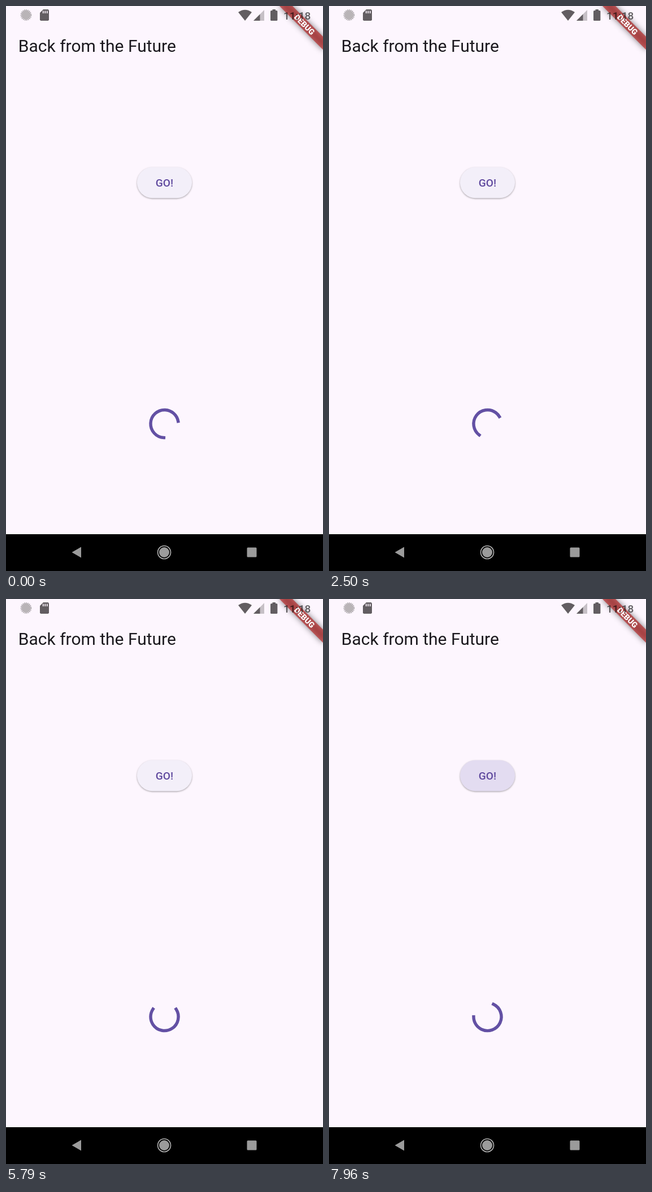
An HTML page with a canvas for the animation above (8 s loop, 561 by 998 pixels).

```html
<!DOCTYPE html>
<html lang="en">
<head>
<meta charset="utf-8">
<title>Back from the Future</title>
<style>
  html, body { margin: 0; width: 100%; height: 100%; overflow: hidden; background: #fdf6fe; }
  canvas { display: block; }
</style>
</head>
<body>
<canvas id="stage" width="561" height="998"></canvas>
<script>
const ctx = document.getElementById('stage').getContext('2d');
const W = 561, H = 998, DP = W / 411.43, LOOP = 8000;
const TAU = Math.PI * 2;
const PATH_MS = 1333, TURN_MS = 2222;
const PATH_PHASE = 0.364, TURN_PHASE = 0.416;
const PAGE = '#fdf6fe', PURPLE = '#6350a4', ICON = '#625d61';
const BUTTON = { x: 231.9, y: 284.7, w: 97.2, h: 54.5 };

const clamp = v => Math.min(1, Math.max(0, v));
const frac = v => v - Math.floor(v);

// cubic-bezier(0.4, 0, 0.2, 1), solved for x by bisection
function ease(x) {
  if (x <= 0 || x >= 1) return clamp(x);
  let lo = 0, hi = 1;
  for (let i = 0; i < 24; i++) {
    const u = (lo + hi) / 2, v = 1 - u;
    if (1.2 * v * v * u + 0.6 * v * u * u + u * u * u < x) lo = u; else hi = u;
  }
  return lo * lo * (3 - 2 * lo);
}

function text(str, x, y, size, weight, color, align = 'left') {
  ctx.font = `${weight} ${size}px Roboto, sans-serif`;
  ctx.textAlign = align;
  ctx.fillStyle = color;
  ctx.fillText(str, x, y);
}

function poly(color, ...pts) {
  ctx.beginPath();
  for (let i = 0; i < pts.length; i += 2) ctx.lineTo(pts[i], pts[i + 1]);
  ctx.closePath();
  ctx.fillStyle = color;
  ctx.fill();
}

function disc(x, y, r, color) {
  ctx.beginPath();
  ctx.arc(x, y, r, 0, TAU);
  ctx.fillStyle = color;
  ctx.fill();
}

function ring(x, y, r, width, color) {
  ctx.beginPath();
  ctx.arc(x, y, r, 0, TAU);
  ctx.lineWidth = width;
  ctx.strokeStyle = color;
  ctx.stroke();
}

function pill(color) {
  ctx.beginPath();
  ctx.roundRect(BUTTON.x, BUTTON.y, BUTTON.w, BUTTON.h, BUTTON.h / 2);
  ctx.fillStyle = color;
  ctx.fill();
}

function drawBanner() {
  ctx.save();
  ctx.translate(W, 0);
  ctx.rotate(Math.PI / 4);
  const band = [-40, 28, 80, 12].map(v => v * DP);
  ctx.filter = 'blur(5.4px)';
  ctx.fillStyle = 'rgba(0,0,0,0.5)';
  ctx.fillRect(...band);
  ctx.filter = 'none';
  ctx.fillStyle = 'rgba(183,28,28,0.63)';
  ctx.fillRect(...band);
  text('DEBUG', 0, 34 * DP + 5, 10.2 * DP, 900, '#fff', 'center');
  ctx.restore();
}

function drawStatus() {
  disc(35.5, 16, 8.2, '#b9b4b7');
  ctx.setLineDash([1.6, 1.4]);
  ring(35.5, 16, 9, 1.6, '#9a9599');
  ctx.setLineDash([]);

  poly(ICON, 66, 6, 74.5, 6, 76, 7.5, 76, 24.5, 74.5, 26, 61.5, 26, 60, 24.5, 60, 12);
  ctx.fillStyle = PAGE;
  for (const x of [65.5, 69, 72.5]) ctx.fillRect(x - 0.6, 8.5, 1.7, 4.5);

  ctx.beginPath();
  ctx.moveTo(423, 26);
  ctx.lineTo(411, 11);
  ctx.quadraticCurveTo(423, 2.5, 435, 11);
  ctx.closePath();
  ctx.fillStyle = ICON;
  ctx.fill();

  poly('#c6c0c6', 457, 7, 457, 26, 438, 26);
  poly(ICON, 449.5, 14.5, 449.5, 26, 438, 26);

  ctx.fillStyle = ICON;
  ctx.fillRect(471.5, 6, 5.5, 3);
  ctx.beginPath();
  ctx.roundRect(468, 8, 12.4, 18, 1.5);
  ctx.fill();

  text('11:18', 491, 23.5, 14 * DP, 500, 'rgba(0,0,0,0.6)');
}

function drawNav() {
  const gray = '#9b9b9b';
  ctx.fillStyle = '#000';
  ctx.fillRect(0, 933, W, H - 933);
  poly(gray, 116.5, 965, 133, 955.5, 133, 974.5);
  disc(280, 965, 9, gray);
  ring(280, 965, 11.5, 1.6, '#b5b5b5');
  ctx.beginPath();
  ctx.roundRect(426.5, 956.5, 17, 17, 1.5);
  ctx.fillStyle = gray;
  ctx.fill();
}

function drawButton(t) {
  ctx.save();
  ctx.shadowColor = 'rgba(0,0,0,0.34)';
  ctx.shadowBlur = 3;
  ctx.shadowOffsetY = 1.2;
  pill('#f3eff9');
  ctx.restore();

  // press highlight and spreading ink
  const press = clamp((t - 6300) / 600);
  if (press > 0) {
    pill(`rgba(103,80,164,${0.08 * press})`);
    ctx.save();
    ctx.beginPath();
    ctx.roundRect(BUTTON.x, BUTTON.y, BUTTON.w, BUTTON.h, BUTTON.h / 2);
    ctx.clip();
    disc(280.5, 312, 15 + 45 * press, `rgba(103,80,164,${0.03 + 0.01 * press})`);
    ctx.restore();
  }
  text('GO!', 280.5, 318.8, 14 * DP, 500, '#604a9f', 'center');
}

// The spinner stalls briefly, then catches up with a slight lag.
function spinnerTime(t) {
  if (t < 5625) return t;
  return t < 5830 ? 5625 : t - 20;
}

function drawSpinner(t) {
  const ms = spinnerTime(t);
  const path = frac(PATH_PHASE + ms / PATH_MS);
  const turn = frac(TURN_PHASE + ms / TURN_MS);
  const head = ease(clamp(path * 2)), tail = ease(clamp(path * 2 - 1));
  const start = TAU * (-0.25 + 0.75 * tail + turn + 0.25 * path);
  const sweep = Math.max(TAU * 0.75 * (head - tail), 0.001);
  ctx.beginPath();
  ctx.arc(280.5, 738, 18 * DP, start, start + sweep);
  ctx.lineWidth = 4 * DP;
  ctx.lineCap = 'square';
  ctx.strokeStyle = PURPLE;
  ctx.stroke();
  ctx.lineCap = 'butt';
}

function draw(now) {
  const t = now % LOOP;
  ctx.fillStyle = PAGE;
  ctx.fillRect(0, 0, W, H);
  text('Back from the Future', 16 * DP, 80.5, 22 * DP, 400, '#1b191e');
  drawButton(t);
  drawSpinner(t);
  drawBanner();
  drawStatus();
  drawNav();
}

const began = performance.now();
function tick() {
  draw(performance.now() - began);
  requestAnimationFrame(tick);
}
tick();
</script>
</body>
</html>
```
